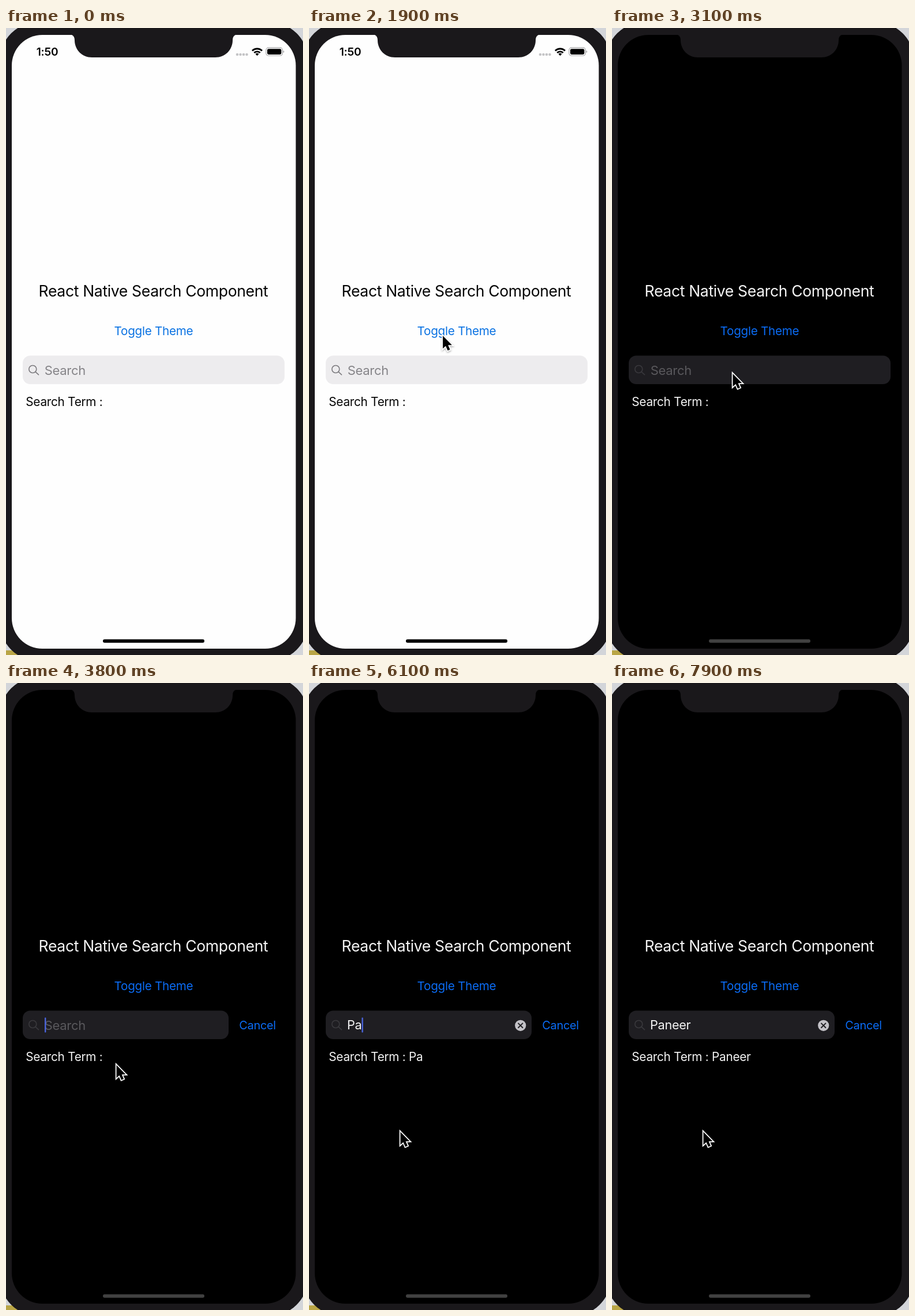
Write an HTML page that moves like this. It is 515x1088 px and loops after 8000 ms.

```html
<!DOCTYPE html>
<html lang="en">
<head>
<meta charset="utf-8">
<title>Search component</title>
<style>
  html, body { margin: 0; width: 100%; height: 100%; overflow: hidden; background: #d3d5d9; }
  svg {
    display: block; width: 515px; height: 1088px;
    font-family: Inter, "Open Sans", sans-serif; font-optical-sizing: none;
    --screen: #fefefe; --ink: #050505; --link: #0a72e2; --field: #edecee;
    --hint: #858488; --icon: #7b7a7e; --home: #000;
  }
  svg.dark {
    --screen: #000; --ink: #f4f4f4; --link: #0b6cf5; --field: #1f1e22;
    --hint: #59585c; --icon: #3a393d; --home: #414141;
  }
  text { letter-spacing: -.014em; }
  .dark #status { display: none; }
  .ink { fill: var(--ink); }
  .link { fill: var(--link); }
</style>
</head>
<body>
<svg id="stage" viewBox="0 0 515 1088">
  <defs>
    <clipPath id="glass"><rect x="10" y="12" width="492.5" height="1065" rx="53"/></clipPath>
    <filter id="shade" x="-50%" y="-50%" width="200%" height="200%">
      <feDropShadow dx="0" dy="1.5" stdDeviation="1.5" flood-opacity=".35"/>
    </filter>
  </defs>

  <rect width="515" height="1088" fill="#d3d5d9"/>
  <rect y="1080" width="40" height="8" fill="#b9a545"/>
  <rect x="-12" y="-12" width="537" height="1112" rx="72" fill="#1a181b"/>

  <g clip-path="url(#glass)">
    <rect x="10" y="12" width="493" height="1065" fill="var(--screen)"/>
    <path fill="#1a181b" d="M109 11C116 11 119 15 119 21C119 38 132 51 149 51H363C380 51 393 38 393 21C393 15 396 11 403 11Z"/>

    <g id="status">
      <text x="71.5" y="48" font-size="19.2" font-weight="600" text-anchor="middle">1:50</text>
      <g fill="#c4c4c6">
        <circle cx="401" cy="46" r="2.3"/><circle cx="406.5" cy="46" r="2.3"/>
        <circle cx="412" cy="46" r="2.3"/><circle cx="417.5" cy="46" r="2.3"/>
      </g>
      <g fill="none" stroke="#000" stroke-width="2.9">
        <path d="M427 39.5a12 12 0 0 1 17 0M430.3 43a7.4 7.4 0 0 1 10.4 0"/>
      </g>
      <path d="M435.5 48.2l-3-3.1a4.3 4.3 0 0 1 6 0z"/>
      <rect x="451" y="34.2" width="28.4" height="13.8" rx="4" fill="none" stroke="#a3a3a5" stroke-width="1.2"/>
      <rect x="453" y="36.2" width="24.4" height="9.8" rx="2.4"/>
      <path d="M480.6 39q1.8 .6 1.8 2.1t-1.8 2.1z" fill="#a3a3a5"/>
    </g>

    <text class="ink" x="255.5" y="466.3" font-size="26.6" text-anchor="middle">React Native Search Component</text>
    <text class="link" id="toggle" x="256" y="533" font-size="20.7" text-anchor="middle">Toggle Theme</text>

    <rect id="bar" x="29" y="568.5" width="454" height="49.5" rx="13" fill="var(--field)"/>
    <path d="M52.8 592a6.5 6.5 0 1 1-13 0a6.5 6.5 0 1 1 13 0M51 596.6l5.5 5" fill="none"
      stroke="var(--icon)" stroke-width="1.6" stroke-linecap="round"/>
    <text id="hint" x="66.7" y="601.5" font-size="22" fill="var(--hint)">Search</text>
    <text class="ink" id="typed" x="66" y="601.3" font-size="21.7"></text>
    <rect id="caret" y="580.5" width="2.4" height="26" rx="1" fill="#4a64dc"/>
    <g id="clear">
      <circle cx="366.7" cy="594.3" r="9.6" fill="#c3c2c7"/>
      <path d="M363 590.6l7.4 7.4m0-7.4l-7.4 7.4" stroke="#1f1e22" stroke-width="1.9" stroke-linecap="round"/>
    </g>
    <text class="link" id="cancel" y="600.7" font-size="19.9">Cancel</text>
    <text class="ink" id="term" x="34.3" y="656" font-size="20.8"></text>
    <rect x="168" y="1060.7" width="176" height="6" rx="3" fill="var(--home)"/>
  </g>

  <g id="cursor" filter="url(#shade)">
    <path transform="scale(.95)" d="M0 0V23.5L5.3 18.6L9 27L13.2 25.2L9.6 17.1H16.8Z" fill="#000" stroke="#fff"
      stroke-width="3.6" paint-order="stroke"/>
  </g>
</svg>

<script>
const LOOP = 8000, STEP = 100;
const $ = id => document.getElementById(id);
const stage = $('stage');

// [time, x, y] of the pointer; each run is one visible stretch
const runs = [
  { until: 400, path: [[100, 275, 751], [200, 231, 818], [300, 175, 895]] },
  { until: LOOP, path: [
    [800, 10, 1053], [1200, 138, 760], [1600, 232, 534], [2600, 232, 534],
    [2900, 203, 583], [3100, 209.5, 600], [3600, 209.5, 600], [4100, 158.5, 779]
  ] }
];
const keys = [[0, ''], [5700, 'P'], [6000, 'Pa'], [6300, 'Pan'], [6400, 'Pane'], [6600, 'Panee'], [6800, 'Paneer']];
const blink = [[3400, 0], [3700, 1], [4500, 1], [4900, 0], [5000, 0], [5300, 1], [7500, 1], [7900, 0]];
const press = [[2000, 1], [2100, .62], [2300, 1]];

const smooth = p => p * p * (3 - 2 * p);

// Eased value of one column of a step table
function at(table, t, col = 1) {
  const i = table.findIndex(row => row[0] > t);
  if (i === 0) return table[0][col];
  if (i < 0) return table[table.length - 1][col];
  const a = table[i - 1], b = table[i];
  return a[col] + (b[col] - a[col]) * smooth((t - a[0]) / (b[0] - a[0]));
}

function show(el, on) { el.style.display = on ? '' : 'none'; }

function draw(t) {
  stage.classList.toggle('dark', t >= 2100);
  $('toggle').setAttribute('opacity', at(press, t));

  const open = at([[3400, 0], [3800, 1]], t);
  $('bar').setAttribute('width', 454 - 97 * open);
  $('cancel').setAttribute('x', 501.3 - 97 * open);
  $('cancel').setAttribute('opacity', open);

  const word = keys.filter(k => k[0] <= t).pop()[1];
  $('typed').textContent = word;
  $('term').textContent = 'Search Term : ' + word;
  show($('hint'), !word);
  show($('clear'), word);
  $('caret').setAttribute('x', word ? 66 + $('typed').getComputedTextLength() : 67);
  $('caret').setAttribute('opacity', at(blink, t));

  const run = runs.find(r => t >= r.path[0][0] && t < r.until);
  show($('cursor'), run);
  if (run) $('cursor').setAttribute('transform', `translate(${at(run.path, t)} ${at(run.path, t, 2)})`);
}

function tick() {
  const t = performance.now() % LOOP;
  draw(Math.floor(t / STEP) * STEP);
  requestAnimationFrame(tick);
}
tick();
</script>
</body>
</html>
```
